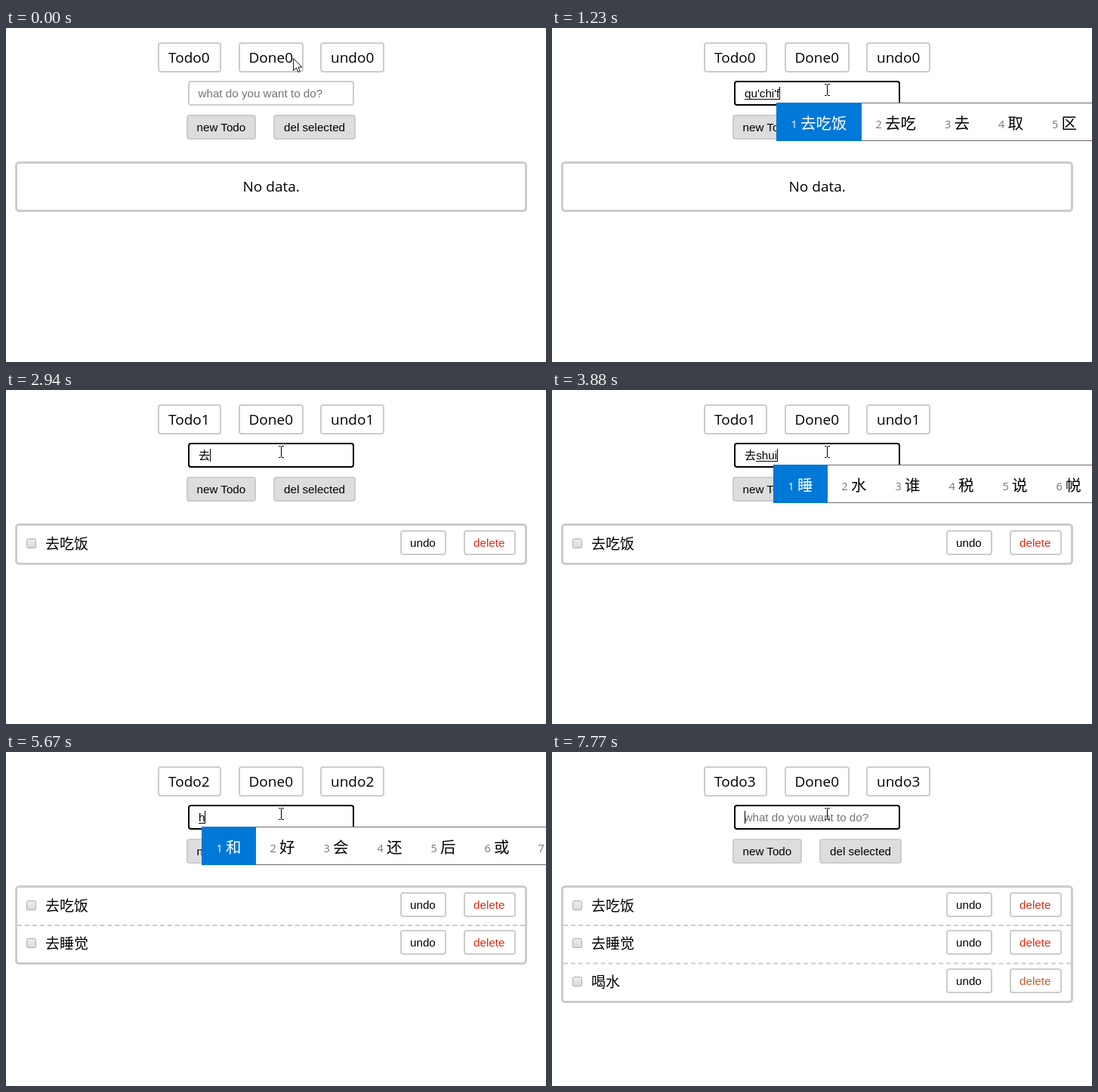
An HTML page for the animation above (8000 ms loop, 715x443 px).

```html
<!DOCTYPE html>
<html lang="zh-CN">
<head>
<meta charset="utf-8">
<title>Todo list</title>
<style>
  html, body { margin: 0; width: 100%; height: 100%; overflow: hidden; background: #fff; }
  svg { display: block; }
  text { white-space: pre; }
  .ui { font: 19px "Open Sans", "Noto Sans", sans-serif; }
  .han { font: 19px "Noto Sans CJK SC", "Noto Sans CJK", sans-serif; }
  .field { font: 15.2px "Liberation Sans", "Noto Sans CJK SC", "Noto Sans CJK", Arial, sans-serif; }
  .cand { font: 20.5px "Noto Sans CJK SC", "Noto Sans CJK", sans-serif; }
  .num { font: 14.5px "Open Sans", "Noto Sans", sans-serif; }
</style>
</head>
<body>
<svg id="stage" width="715" height="443" viewBox="0 0 715 443">
  <defs>
    <linearGradient id="check" x2="0" y2="1">
      <stop stop-color="#eee"/><stop offset="1" stop-color="#d9d9d9"/>
    </linearGradient>
  </defs>
  <g id="page"></g>
  <g id="entry"></g>
  <g id="popup"></g>
  <g id="pointer"></g>
</svg>
<script>
const LOOP = 8000, INPUT_X = 255;
const TASKS = ["去吃饭", "去睡觉", "喝水"];
const layer = id => document.getElementById(id);

// Each step changes only the listed properties of the previous one.
const typing = (keys, words) => ({ keys, words, caret: true });
const commit = done => ({ done, keys: "", words: "", caret: true });
const submit = count => ({ ...commit(""), count });
const steps = [
  [0, { count: 0, done: "", keys: "", words: "", caret: false, focus: false, arrow: [380, 40] }],
  [150, { arrow: [374, 54] }],
  [230, { arrow: [366, 71] }],
  [310, { arrow: null }],
  [390, { focus: true, caret: true }],
  [540, typing("q", "去 请 却 前 且 区 全")],
  [620, typing("qu", "去 取 区 曲 趣 渠 娶")],
  [690, typing("qu'c", "去除 取出 去吃 驱车 去处")],
  [770, typing("qu'ch", "去除 取出 去吃 驱车 去处")],
  [1080, typing("qu'chi", "去吃 驱驰 去 取 区")],
  [1230, typing("qu'chi'f", "去吃饭 去吃 去 取 区")],
  [1310, typing("qu'chi'fan", "去吃饭 去吃 去 取 区")],
  [1550, commit("去吃饭")],
  [1930, submit(1)],
  [2390, { caret: false }],
  [2550, typing("q", "去 请 却 前 且 区 全")],
  [2630, typing("qu", "去 取 区 曲 趣 渠 娶")],
  [2940, commit("去")],
  [3250, typing("s", "是 上 说 时 岁 三 所")],
  [3330, typing("sh", "是 上 说 时 使 事 谁")],
  [3640, typing("shu", "数 书 属 树 输 熟 束")],
  [3880, typing("shui", "睡 水 谁 税 说 帨 祱")],
  [4110, typing("shui'j", "睡觉 水晶 水井 税金 水饺")],
  [4180, typing("shui'ju", "睡具 水居 睡 水 谁 税")],
  [4350, typing("shui'jue", "睡觉 水 睡 谁 税 说")],
  [4650, commit("去睡觉")],
  [4970, submit(2)],
  [5520, { caret: false }],
  [5600, typing("h", "和 好 会 还 后 或 很")],
  [5750, typing("he", "和 何 & 河 Σ 喝 合")],
  [6300, { caret: false }],
  [6760, { caret: true }],
  [6840, typing("he's", "何时 喝水 合适 和 何")],
  [6990, typing("he'sh", "何时 喝水 合适 和 何")],
  [7150, typing("he'shu", "和数 合数 喝 和 何 河")],
  [7310, typing("he'shui", "喝水 河水 和 何 喝 河")],
  [7690, commit("喝水")],
  [7770, submit(3)]
];

const text = (cls, x, y, value, fill = "#000") =>
  `<text class="${cls}" x="${x}" y="${y}" fill="${fill}">${value}</text>`;
const rect = (x, y, w, h, fill) =>
  `<rect x="${x}" y="${y}" width="${w}" height="${h}" fill="${fill}"/>`;

function box(left, top, right, bottom, { fill = "#fff", stroke = "#ccc", line = 2, radius = 3 } = {}) {
  const half = line / 2;
  return `<rect x="${left + half}" y="${top + half}" width="${right - left - line}"
    height="${bottom - top - line}" rx="${radius}" fill="${fill}" stroke="${stroke}" stroke-width="${line}"/>`;
}

function row(name, i) {
  const dy = Math.floor(50.5 * i);
  const divider = i
    ? `<path d="M15 ${179.5 + dy + (i === 1 ? .5 : 0)}H687" stroke="#ccc" stroke-width="2" stroke-dasharray="6 3.94"/>`
    : "";
  return divider +
    `<rect x="27.5" y="${197.5 + dy}" width="12" height="12" rx="2" fill="url(#check)" stroke="#aaa"/>` +
    text("han", 52, 211 + dy, name) +
    box(522, 186 + dy, 583, 219 + dy) + text("field", 535, 208 + dy, "undo") +
    box(606, 186 + dy, 675, 219 + dy) +
    text("field", 619, 208 + dy, "delete", i === 2 ? "#c4602c" : "#dc2a14");
}

function drawPage({ count }) {
  const bottom = count ? 232 + Math.floor(50.5 * (count - 1)) : 244;
  layer("page").innerHTML =
    box(201, 19, 285, 59) + text("ui", 215, 46, "Todo" + count) +
    box(308, 19, 394, 59) + text("ui", 321.5, 46, "Done0") +
    box(416, 19, 501, 59) + text("ui", 430, 46, "undo" + count) +
    box(239, 115, 331, 148, { fill: "#ddd" }) + text("field", 252.5, 137, "new Todo") +
    box(354, 115, 463, 148, { fill: "#ddd" }) + text("field", 368, 137, "del selected") +
    box(12, 177, 690, bottom, { line: 3, radius: 4 }) +
    (count ? TASKS.slice(0, count).map(row).join("") : text("ui", 313.5, 217, "No data."));
}

// Draws the input and returns the x position of the caret.
function drawEntry({ done, keys, focus, caret }) {
  const entry = layer("entry"), value = done + keys;
  entry.innerHTML = box(241, 70, 461, 103, { stroke: focus ? "#000" : "#ccc" }) +
    (value ? text("field", INPUT_X, 92, value)
           : text("field", INPUT_X - .5, 92, "what do you want to do?", "#757575"));
  const label = entry.querySelector("text");
  const end = INPUT_X + (value ? label.getComputedTextLength() : 0);
  let marks = "";
  if (keys) {
    const start = INPUT_X + (done ? label.getSubStringLength(0, done.length) : 0);
    marks += rect(Math.round(start), 94, Math.floor(end) - Math.round(start), 1, "#000");
  }
  if (caret) marks += rect(Math.floor(end), 78, 1, 17, "#000");
  entry.insertAdjacentHTML("beforeend", marks);
  return end;
}

function drawPopup({ done, words }, caretX) {
  if (!words) { layer("popup").innerHTML = ""; return; }
  const left = Math.round(caretX - 4.2) - (done ? 1 : 0);
  let x = left + 20;
  let out = rect(left, 99, 715 - left, 51, "#fff") +
    rect(left, 99, 715 - left, 1, "#6b6b6b") + rect(left, 149, 715 - left, 1, "#6b6b6b");
  words.split(" ").forEach((word, i) => {
    const width = word === "Σ" ? 12 : 20.5 * word.length;
    if (!i) out += rect(left, 99, Math.round(51 + width), 51, "#0078d7");
    out += text("num", x - .5, 133, i + 1, i ? "#777" : "#fff") +
      text("cand", x + 12, 133.5, word, i ? "#000" : "#fff");
    x += 50.5 + width;
  });
  layer("popup").innerHTML = out;
}

function drawPointer({ arrow }) {
  layer("pointer").innerHTML = arrow
    ? `<path transform="translate(${arrow})" d="M.5 .5V16.5L4.3 13L6.8 18.5L9.3 17.4L6.9 12H12Z"
        fill="#fff" stroke="#1c1024"/>`
    : `<path d="M361 74.5H363.5L364.5 75.5L365.5 74.5H368M364.5 75V89M361 89.5H363.5L364.5 88.5L365.5 89.5H368"
        fill="none" stroke="#000"/>`;
}

let state = {};
const timeline = steps.map(([time, change]) => {
  state = { ...state, ...change };
  return { time, state };
});

let shown = null;
function render(ms) {
  const t = ms % LOOP;
  const current = timeline.findLast(step => step.time <= t).state;
  if (current === shown) return;
  shown = current;
  drawPage(current);
  drawPopup(current, drawEntry(current));
  drawPointer(current);
}

const began = performance.now();
function tick() {
  render(performance.now() - began);
  requestAnimationFrame(tick);
}
tick();
</script>
</body>
</html>
```
